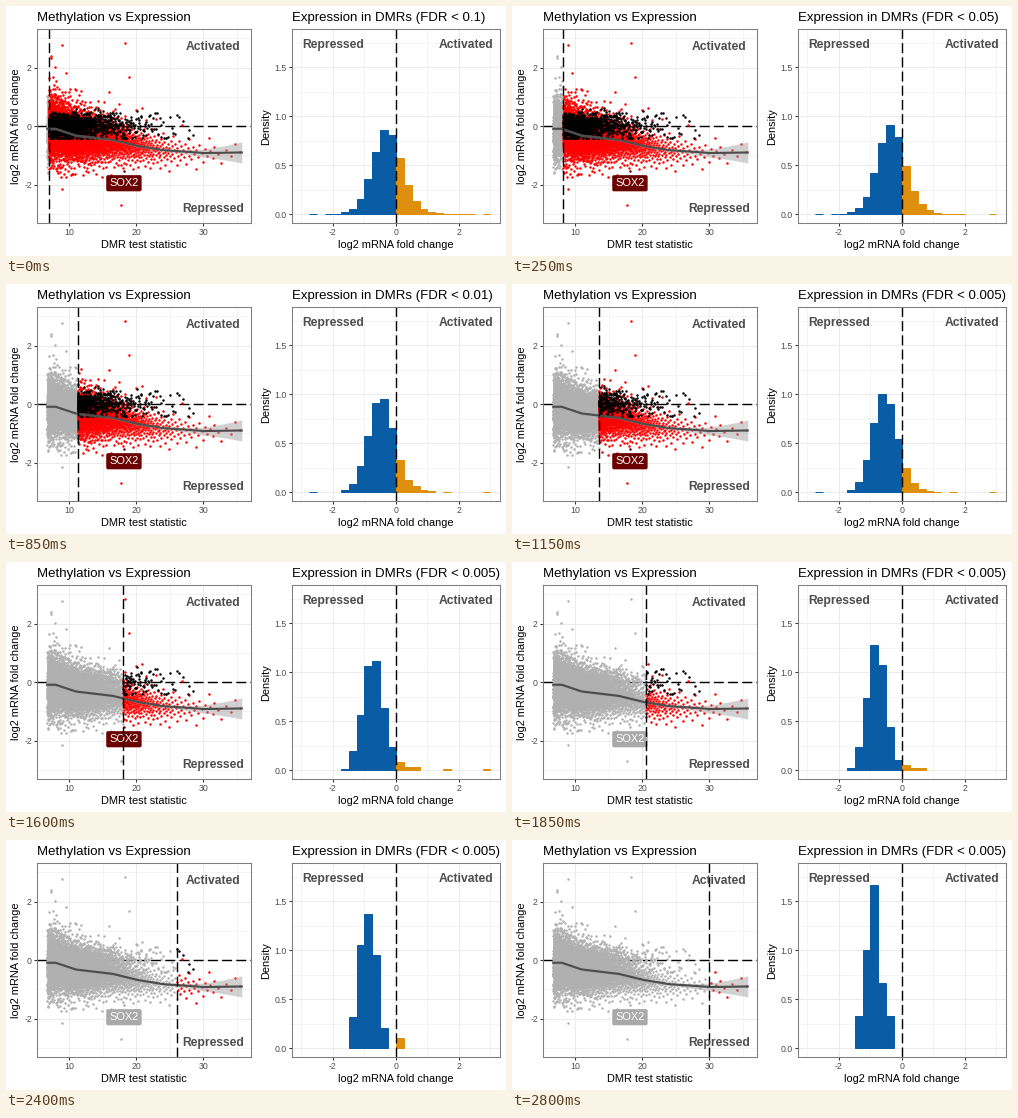
A matplotlib script that plays this animation: 500x250 px, repeating every 2850 ms.

```python
import numpy as np
import matplotlib.pyplot as plt
from matplotlib.animation import FuncAnimation

W, H, DPI = 500, 250, 100
FRAMES, STEP = 57, 50
GREY, DARK, TICK, BORDER = "#b0b0b0", "#4d4d4d", "#333333", "#7f7f7f"
RED, MAROON, BLUE, ORANGE = "#ff0000", "#6b0000", "#0a5da4", "#de8f0e"

plt.rcParams["font.family"] = "Liberation Sans"
plt.rcParams["axes.unicode_minus"] = False
rng = np.random.default_rng(12)


def px(n):
    """Pixels to points."""
    return n * 72 / DPI


# ---- data -------------------------------------------------------------

cuts = np.r_[np.arange(7, 12.01, 0.25), np.arange(12.5, 30.01, 0.5)]
edges = np.linspace(-2.75, 3, 24)


def trend(x):
    return np.interp(x, [6.7, 8, 11, 16.5, 20, 24, 30, 35.7],
                     [-0.09, -0.09, -0.32, -0.47, -0.67, -0.82, -0.92, -0.9])


def decay(n, rate, end):
    """Ordered positions from 7 to end, thinning exponentially."""
    u = (np.arange(n) + rng.random(n)) / n
    return 7 - np.log(1 - u * (1 - np.exp(-rate * (end - 7)))) / rate


def spread(x):
    """Logistic scatter about the trend, evenly stratified along x."""
    u = (np.arange(x.size) * 0.618034 + 0.02 * rng.random(x.size)) % 1
    u = np.clip(u, 2e-5, 1 - 2e-5)
    noise = (0.27 - 0.0055 * (x - 7)) * np.log(u / (1 - u))
    return trend(x) + noise + 0.04 * noise ** 2


rx = decay(4000, 0.24, 35.8)
outliers = [(8.9, 2.78), (18.3, 2.82), (17.7, -2.68)]
red = np.vstack([np.c_[rx, spread(rx)], outliers])

bx = decay(1800, 0.27, 29)
black = np.c_[bx, np.clip(rng.normal(0, 0.17 + 0.008 * (bx - 7)), -0.42, 0.85)]

wx = rng.uniform(6.75, 7, 260)
weak = np.c_[wx, rng.normal(-0.15, 0.55, wx.size)]
sox = (18.16, -1.53)

# ---- stage ------------------------------------------------------------

fig = plt.figure(figsize=(W / DPI, H / DPI), dpi=DPI, facecolor="white")


def panel(left, right, xlim, ylim, yt, xminor, yminor):
    top, bottom = 23, 216.5
    ax = fig.add_axes([left / W, 1 - bottom / H,
                       (right - left) / W, (bottom - top) / H])
    ax.set(xlim=xlim, ylim=ylim)
    ax.set_xticks(np.array(xminor[:-1]) + (xminor[1] - xminor[0]) / 2)
    ax.set_yticks(yt)
    ax.set_xticks(xminor, minor=True)
    ax.set_yticks(yminor, minor=True)
    ax.set_axisbelow(True)
    ax.grid(which="major", color="#ebebeb", lw=px(1.07))
    ax.grid(which="minor", color="#ebebeb", lw=px(0.55))
    ax.tick_params(which="major", length=px(2.75), width=px(1.07),
                   pad=px(2.3), color=TICK, labelcolor=DARK,
                   labelsize=px(8.8))
    ax.tick_params(which="minor", length=0)
    for spine in ax.spines.values():
        spine.set(color=BORDER, linewidth=px(1.07), zorder=8)
    return ax


def write(x, y, s, size, **kw):
    kw = {"ha": "center", "va": "center", "color": "black", **kw}
    return fig.text(x / W, 1 - y / H, s, fontsize=px(size), **kw)


def dashed(ax, x, y, z):
    return ax.plot(x, y, color="black", lw=px(1.42), zorder=z,
                   dashes=(7, 3), dash_capstyle="butt")[0]


XL, YL = (5.22, 37.0), (-3.29, 3.314)
HX, HY = (-3.3, 3.32), (-0.085, 1.89)
left = panel(31, 244.5, XL, YL, [-2, 0, 2], [5, 15, 25, 35], [-3, -1, 1, 3])
right = panel(286, 494.5, HX, HY, [0, 0.5, 1, 1.5],
              [-3, -1, 1, 3], [0.25, 0.75, 1.25, 1.75])
for ax, lim in [(left, XL), (right, HX)]:
    ax.set_xlim(lim)
right.set_yticklabels(["0.0", "0.5", "1.0", "1.5"])

# Scatter panel
dashed(left, XL, (0, 0), 2)


def dots(color, z):
    return left.plot([], [], "o", ms=px(2.5), color=color, mew=0, zorder=z)[0]


grey_dots, red_dots, black_dots = dots(GREY, 3), dots(RED, 3.1), dots("black", 3.2)
sox_dot = dots(MAROON, 3.3)
sox_dot.set_data([sox[0]], [sox[1]])

sx = np.linspace(6.75, 35.7, 200)
sy = trend(sx)
half = 0.04 + 0.32 * (np.clip(sx - 23, 0, None) / 12.7) ** 2
left.fill_between(sx, sy - half, sy + half, color="#999999", alpha=0.45,
                  lw=0, zorder=4)
left.plot(sx, sy, color=DARK, lw=px(2.13), zorder=4.1)

tag = left.text(18.16, -1.95, "SOX2", color="white", fontsize=px(11),
                ha="center", va="center", zorder=5,
                bbox=dict(boxstyle="round,pad=0.28,rounding_size=0.16",
                          fc=MAROON, ec="none"))
cut_line = dashed(left, (7, 7), YL, 6)

# Histogram panel
bars = right.bar(edges[:-1], np.zeros(23), 0.25, align="edge", lw=px(1),
                 color=[BLUE if e < 0 else ORANGE for e in edges[:-1]],
                 zorder=3)
for bar in bars:
    bar.set_edgecolor(bar.get_facecolor())
dashed(right, (0, 0), HY, 5)

# Lettering
write(31, 15, "Methylation vs Expression", 13.2, ha="left", va="baseline")
title = write(286, 15, "", 13.2, ha="left", va="baseline")
write(137.5, 239, "DMR test statistic", 11)
write(390, 239, "log2 mRNA fold change", 11)
write(10, 120.5, "log2 mRNA fold change", 11, rotation=90)
write(260, 120.5, "Density", 11, rotation=90)
for x, y, s in [(207.3, 40.7, "Activated"), (207.3, 202.7, "Repressed"),
                (460, 38.7, "Activated"), (326.7, 38.7, "Repressed")]:
    write(x, y, s, 12.1, weight="bold", color=DARK)


def fdr(t):
    for limit, value in [(8, "0.1"), (10, "0.05"), (12, "0.01")]:
        if t < limit:
            return value
    return "0.005"


def draw(i):
    t = cuts[i]
    r, b = red[:, 0] >= t, black[:, 0] >= t
    grey_dots.set_data(*np.vstack([weak, red[~r], black[~b]]).T)
    red_dots.set_data(*red[r].T)
    black_dots.set_data(*black[b].T)
    cut_line.set_xdata((t, t))

    tone = MAROON if t <= sox[0] else "#a9a9a9"
    tag.get_bbox_patch().set_facecolor(tone)
    sox_dot.set_color(tone)

    density = np.histogram(red[r, 1], edges, density=True)[0]
    for bar, h in zip(bars, density):
        bar.set_height(h)
        bar.set_visible(h > 0)
    title.set_text(f"Expression in DMRs (FDR < {fdr(t)})")
    return []


anim = FuncAnimation(fig, draw, frames=FRAMES, interval=STEP,
                     init_func=lambda: draw(0), repeat=True,
                     repeat_delay=0, blit=False)
plt.show()
```
